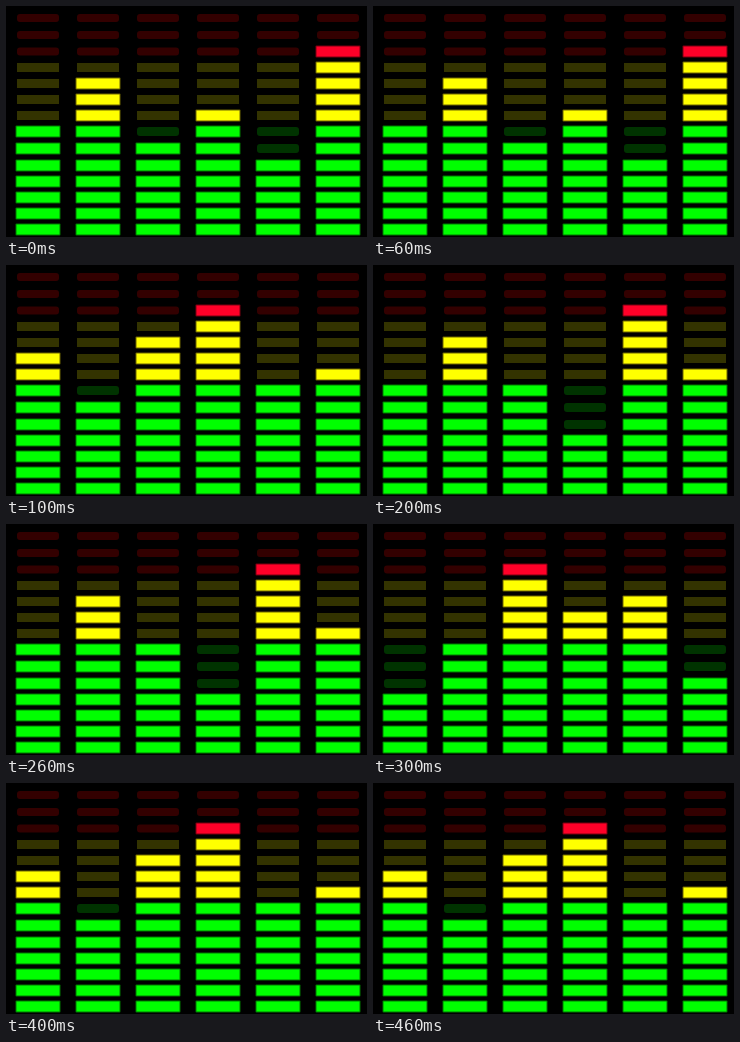
Write an HTML page with a canvas that moves like this. It is 361x231 px and loops after 0.5 s.

```html
<!DOCTYPE html>
<html>
<head>
<meta charset="utf-8">
<style>
  html, body { margin: 0; overflow: hidden; background: #000; }
  canvas { display: block; }
</style>
</head>
<body>
<canvas id="stage" width="361" height="231"></canvas>
<script>
const ctx = document.getElementById('stage').getContext('2d');
const STEP = 100;
const ROW_Y = [223, 207, 191, 175, 159, 142, 125, 109, 93, 77, 61, 45, 28.5, 11.5];

// Lit segments per column at each step
const peak = [9, 6, 10, 12, 7, 8];
const levels = [
  [7, 10, 6, 8, 5, 12],
  peak,
  [7, 10, 7, 4, 12, 8],
  [4, 7, 12, 9, 10, 5],
  peak,
];

const green = { lit: '#00ff00', dim: '#003300', glow: '#007800', height: 9, radius: 3 };
const yellow = { lit: '#ffff00', dim: '#333300', glow: '#6c6400', height: 9, radius: 0 };
const red = { lit: '#ff0028', dim: '#330000', glow: '#780010', height: 8, radius: 3 };
const zone = row => row < 7 ? green : row < 11 ? yellow : red;

function bar(x, y, w, h, radius, color) {
  ctx.fillStyle = color;
  ctx.beginPath();
  ctx.roundRect(x - w / 2, y - h / 2, w, h, radius);
  ctx.fill();
}

function segment(col, row, lit) {
  const x = 32 + col * 60, y = ROW_Y[row], z = zone(row);
  if (lit) {
    bar(x, y + 0.5, 45, 12, 1, z.glow);
    bar(x, y + 0.5, 43, 10, 0, z.lit);
  } else {
    bar(x, y + 0.5, 42, z.height, z.radius, z.dim);
  }
}

function draw() {
  const step = Math.floor(performance.now() / STEP) % levels.length;
  ctx.fillStyle = '#000';
  ctx.fillRect(0, 0, 361, 231);
  levels[step].forEach((level, col) => {
    for (let row = 0; row < ROW_Y.length; row++) segment(col, row, row < level);
  });
  requestAnimationFrame(draw);
}
draw();
</script>
</body>
</html>
```
